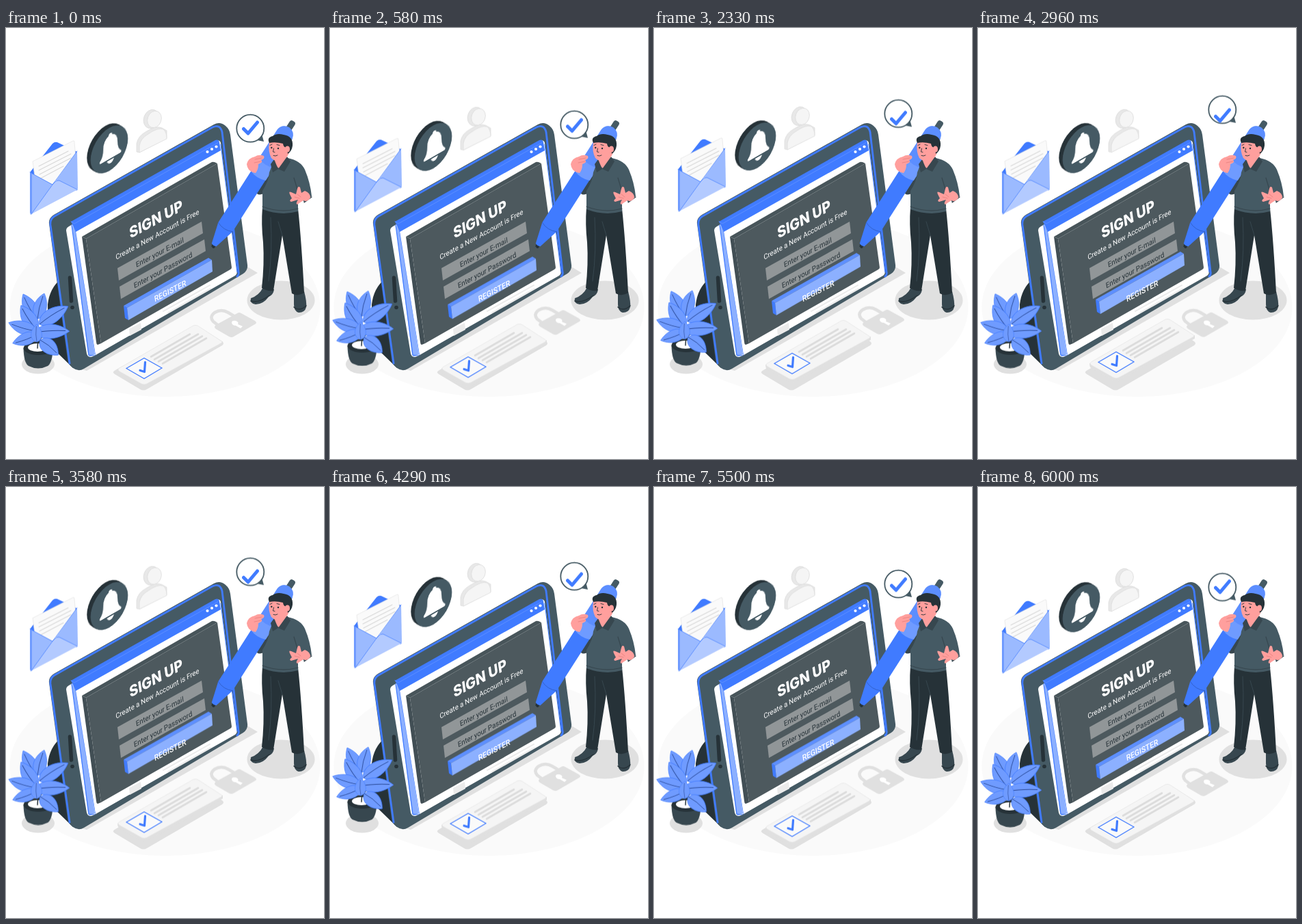
An HTML page for the animation above (6.04 s loop, 465 by 630 pixels).

```html
<!DOCTYPE html>
<html lang="en">
<head>
<meta charset="utf-8">
<title>Sign up</title>
<style>
  html, body { margin: 0; width: 100%; height: 100%; overflow: hidden; background: #fff; }
  svg { display: block; width: 465px; height: 630px; }
  text { font-family: Roboto, Inter, sans-serif; }

  .float { --rise: -9.3px; animation: float 3.02s linear infinite; }
  .slow { animation-duration: 6.04s; }
  .mid { --rise: -18.6px; }
  .high { --rise: -27.9px; }
  @keyframes float { 50% { transform: translateY(var(--rise)); } }

  .blue { fill: #407bff; }
  .soft { fill: #6f9bff; }
  .pale { fill: #8cb0ff; }
  .ink { fill: #263238; }
  .dark { fill: #37474f; }
  .slate { fill: #455a64; }
  .grey { fill: #e0e0e0; }
  .white { fill: #fff; }
  .skin { fill: #ff9f9d; }
  .field { fill: #919698; }
  .line { fill: none; stroke-linecap: round; stroke-linejoin: round; }
</style>
</head>
<body>
<svg viewBox="0 0 465 630">
  <defs>
    <g id="leaf">
      <path d="M0 0C4 -14 25 -16 40 0C25 13 5 13 0 0Z" class="soft" stroke="#407bff" stroke-width=".7"/>
      <path d="M0 0Q16 -3 35 -1" class="line" stroke="#2b4b98" stroke-width=".9"/>
    </g>
  </defs>

  <!-- floor and fixed shadows -->
  <ellipse cx="232.5" cy="408" rx="227" ry="131" fill="#fafafa"/>
  <ellipse cx="47" cy="491.500" rx="24" ry="14" class="grey"/>
  <ellipse cx="402" cy="398" rx="49.500" ry="28.500" class="grey"/>
  <path d="M335 346L353 349L368 358L118 501L100 496Z" class="grey"/>
  <path d="M160 500L276 436Q279 435 282 437L316 458Q320 461 316 464L206 528Q201 531 196 528L159 506Q154 503 160 500Z" class="grey"/>

  <!-- tablet -->
  <path d="M80 367Q64 380 61 404L62 462L98 497L108 480Z" class="ink"/>
  <path d="M63 286Q62 278 70 273L304 141Q313 136 321 143Q327 148 328 156L353 346Q354 354 347 359L114 498Q106 503 98 497Q91 492 90 485Z" class="slate"/>
  <path d="M93 490L65 288Q64 279 71 275L302 145Q313 140 316 152L340 356Q341 361 338 363" class="line" stroke="#407bff" stroke-width="2.800"/>
  <path d="M93.500 365L95.500 399" class="line" stroke="#263238" stroke-width="5.500"/>
  <circle cx="97" cy="408.500" r="2.800" class="ink"/>
  <path d="M88 296Q88 292 92 290L308 165Q313 163 314 168L338 355Q338 360 335 362L127 480Q120 483 118 476Z" class="white"/>

  <!-- browser window -->
  <path d="M96 287L102 296L130 477L124 480Q121 481 120 477Z" class="pale"/>
  <path d="M96 288L121 478L129 479M102 297L131 478" class="line" stroke="#407bff" stroke-width="1.200"/>
  <path d="M102 297L314 178L337 359L131 478Z" class="white"/>
  <path d="M95 283L306 164Q311 162 312 167L314 179L102 298Z" class="blue"/>
  <path d="M95 283L100 286L311 167" class="line" stroke="#5c8eff" stroke-width="1"/>
  <g class="white">
    <circle cx="294.500" cy="181" r="2.100"/><circle cx="301" cy="177" r="2.100"/><circle cx="307.500" cy="173.500" r="2.100"/>
  </g>
  <path d="M314 170L338 357" class="line" stroke="#407bff" stroke-width="1.200"/>
  <path d="M180 440L197 431L198 441L181 450Z" fill="#ebebeb"/>
  <path d="M230 414L298 376M237 416L299 381" class="line" stroke="#ebebeb" stroke-width="2"/>

  <!-- form -->
  <path d="M111 305L117 308L139 461L134 463Q132 462 132 459Z" fill="#424f55"/>
  <path d="M111 305L301 196Q304 195 309 198L117 308Z" fill="#48555a"/>
  <path d="M117 308L309 198L330 350Q330 352 328 353L139 461Z" fill="#4d595e"/>
  <path d="M163 351L286 283L288 300L165 369Z" class="field"/>
  <path d="M166 378L290 309L292 326L168 396Z" class="field"/>
  <circle cx="303.500" cy="320" r="2" class="ink"/>
  <g class="float slow">
    <path d="M172 406L177 409L179 427L174 424Z" class="blue"/>
    <path d="M172 406L296 336L301 339L177 409Z" fill="#5d8fff"/>
    <path d="M177 409L301 339L302 356L179 427Z" class="pale"/>
  </g>
  <g fill="#fff">
    <text transform="matrix(.87 -.47 .14 .98 181.500 308)" font-size="22" style="font-family:Inter,sans-serif;font-weight:800">SIGN UP</text>
    <text transform="matrix(.87 -.48 .14 .98 161 339)" font-size="10.700">Create a New Account is Free</text>
    <text transform="matrix(.87 -.46 .14 .98 217.500 400.500)" font-size="11.700" font-weight="500">REGISTER</text>
  </g>
  <g class="ink" font-size="10.700">
    <text transform="matrix(.87 -.46 .14 .98 190.500 350)">Enter your E-mail</text>
    <text transform="matrix(.87 -.47 .14 .98 187.500 380.500)">Enter your Password</text>
  </g>

  <!-- envelope -->
  <g class="float">
    <path d="M35 211L68 169Q72 165 77 168L104 181L104 212L37 240Z" class="blue"/>
    <path d="M39 195L98 165Q100 164 100 167L104 212L68 240L43 225Z" fill="#fafafa" stroke="#e0e0e0" stroke-width=".6"/>
    <path d="M48 202L91 180M48 208L95 184M49 214L95 190M50 220L84 202" class="line" stroke="#d8d8d8" stroke-width="1.100"/>
    <path d="M35 211L69 229L38 272Q35 274 35 270Z" fill="#9bbaff"/>
    <path d="M104 180L73 223L103 238Q105 237 105 234Z" fill="#9bbaff"/>
    <path d="M37 272L67 230Q72 222 78 223L105 236Z" fill="#b3caff"/>
    <path d="M35 211L68 229L104 180M37 272L68 229Q73 222 78 223L104 236" class="line" stroke="#407bff" stroke-width=".7"/>
    <path d="M35 211L35 270L38 272L38 213Z" class="soft"/>
  </g>

  <!-- bell -->
  <g class="float">
    <g transform="matrix(.866 -.5 0 1 151 177.500)">
      <circle cx="-6.300" cy="-6.200" r="31.500" class="ink"/>
      <path d="M22 -22.600L-22 22.600L-28.300 16.400L15.700 -28.800Z" class="ink"/>
      <circle r="31.500" class="slate"/>
      <g class="white" transform="translate(2 0)">
        <path d="M-3 -20Q-3 -23 0 -23Q3 -23 3 -20Q12 -17 12 -5Q12 6 18 11Q19 14 16 14H-16Q-19 14 -18 11Q-12 6 -12 -5Q-12 -17 -3 -20Z"/>
        <path d="M-6 16H6Q4 21 0 21Q-4 21 -6 16Z"/>
      </g>
    </g>
  </g>

  <!-- account icon -->
  <g class="float" stroke="#dedede" stroke-width=".8">
    <path d="M191 181L191 169Q193 158 204 152Q219 142 228 146L235 150L235 161L195 182Z" fill="#e8e8e8"/>
    <path d="M195 182L195 172Q197 161 208 155Q222 145 230 148Q235 152 235 162Z" fill="#f5f5f5"/>
    <ellipse cx="212.500" cy="133" rx="11" ry="14" fill="#e8e8e8" transform="rotate(20 212.500 133)"/>
    <ellipse cx="217" cy="133.500" rx="10" ry="12.500" fill="#f5f5f5" transform="rotate(20 217 133.500)"/>
  </g>

  <!-- speech bubble -->
  <g class="float slow high">
    <path d="M367 164L377 166L374 155Z" class="slate"/>
    <circle cx="357.300" cy="146.700" r="20" class="white" stroke="#455a64" stroke-width="1.800"/>
  </g>
  <path class="float slow mid line" d="M347.500 147.500L354 154L367.500 138" stroke="#407bff" stroke-width="5"/>

  <!-- padlock -->
  <g class="float">
    <path d="M312 436L303 429Q297 422 305 416Q315 410 325 416L335 422" class="line" stroke="#e0e0e0" stroke-width="4.600"/>
    <path d="M307 434L338 417Q341 415 344 417L364 428Q368 431 364 433L333 451Q330 453 326 451L307 440Q303 437 307 434Z" class="grey"/>
    <path d="M330 431Q330 427 336 428Q341 430 339 433L346 436L343 439L336 435Q331 435 330 431Z" class="white"/>
  </g>

  <!-- checklist card -->
  <g class="float slow">
    <path d="M163 499L202 519L317 458L317 463L206 525Q202 528 198 525L165 506Q163 504 163 499Z" class="grey"/>
    <path d="M166 497L274 435Q277 434 280 435L314 457Q318 459 314 461L206 520Q202 522 198 520L166 502Q162 499 166 497Z" fill="#f5f5f5" stroke="#e4e4e4" stroke-width=".7"/>
    <path d="M176 497.500L202 482.500L228 497L202 512.500Z" fill="#fafafa" stroke="#407bff" stroke-width="1.200"/>
    <path d="M196 500.500L202.500 502.500L203.500 488.500" class="line" stroke="#407bff" stroke-width="3.200"/>
    <path d="M212 480.500L269 447.500M217 484.500L281 447.500M223 487.500L287 450.500M229 490.500L293 453.500" class="line" stroke="#dcdcdc" stroke-width="2.600"/>
  </g>

  <!-- plant -->
  <g class="float">
    <path d="M25.500 468Q26 490 33 494Q47 501 61 494Q68 489 68.500 468Z" class="dark"/>
    <ellipse cx="47" cy="468" rx="21.500" ry="10" class="ink"/>
    <ellipse cx="46" cy="467" rx="14" ry="6" class="white"/>
    <path d="M46 468Q48 445 45 425M46 460Q38 448 30 440M47 460Q54 448 63 440" class="line" stroke="#263238" stroke-width="1.500"/>
    <use href="#leaf" transform="translate(45 425) rotate(-119) scale(1.030 .95)"/>
    <use href="#leaf" transform="translate(46 425) rotate(-75) scale(.96 .9)"/>
    <use href="#leaf" transform="translate(49 433) rotate(-32) scale(1.230 1)"/>
    <use href="#leaf" transform="translate(45 441) rotate(-123) scale(1.060 1)"/>
    <use href="#leaf" transform="translate(44 443) rotate(197) scale(1.050 .9)"/>
    <use href="#leaf" transform="translate(45 448) rotate(160) scale(.94 .85)"/>
    <use href="#leaf" transform="translate(44 445) rotate(-2) scale(1.220 1)"/>
    <use href="#leaf" transform="translate(50 456) rotate(40) scale(.86 1)"/>
    <use href="#leaf" transform="translate(45 459) rotate(-90) scale(.65 .75)"/>
  </g>

  <!-- pen -->
  <path d="M386 211L371 226Q364 238 367 242Q371 246 379 240L388 228Z" class="dark"/>
  <g transform="translate(302 320.500) rotate(-57.400)">
    <rect x="202" y="-4" width="17" height="9" rx="3.500" class="slate"/>
    <path d="M0 -2L7 -4V4L0 2Z" class="ink"/>
    <path d="M4 -4L35 -12.500H126V12.500H35L4 4Q2 0 4 -4Z" class="blue"/>
    <path d="M35 -12.500Q29 0 35 12.500" class="line" stroke="#315fc8" stroke-width=".8"/>
    <path d="M124 -13H196Q207 -11 208 0Q207 11 196 13H124Q119 0 124 -13Z" class="soft"/>
    <path d="M146 -13H196Q207 -11 208 0Q207 11 196 13H146Q141 0 146 -13Z" class="blue" opacity=".4"/>
  </g>

  <!-- man -->
  <path d="M376 379L392 382Q391 390 384 393Q376 404 365 404Q356 403 358 395Q370 391 376 379Z" class="dark"/>
  <path d="M421 386L436 385Q440 400 439 408Q437 416 428 416Q421 414 421 404Z" class="dark"/>
  <path d="M358 399Q369 403 385 391M421 408Q429 415 439 406" class="line" stroke="#263238" stroke-width="1.500"/>
  <path d="M375 262L427 264Q432 310 436 387Q427 393 418 388L404 303L391 384Q381 385 374 380Q378 345 376 313Q373 287 375 262Z" class="ink"/>
  <path d="M404 303L398 283M387 277Q390 325 384 370" class="line" stroke="#37474f" stroke-width="1"/>
  <path d="M392 193L412 190Q431 194 437 207Q445 226 447 246L436 255L427 238L427 268Q402 275 375 265L375 238Q384 224 385 211Z" class="slate"/>
  <path d="M427 239L421 219M436 255L447 247M375 261Q401 271 427 264" class="line" stroke="#37474f" stroke-width="1.200"/>
  <path d="M393 184L409 182L411 194Q406 205 399 205Q393 201 393 193Z" class="skin"/>
  <path d="M392 192L398 206L390 211L387 199ZM411 188L398 206L407 210L416 195Z" class="dark"/>
  <path d="M385 167Q391 159 402 160Q415 162 415 174Q415 190 402 194Q394 196 388 190Q383 181 385 167Z" class="skin"/>
  <path d="M385 168Q381 160 390 158Q396 153 406 156Q420 158 419 172Q418 180 412 184Q411 178 411 174Q406 176 405 169Q394 166 385 168Z" class="ink"/>
  <ellipse cx="411.500" cy="177" rx="3.500" ry="4.500" class="skin"/>
  <circle cx="388.300" cy="175" r="1.200" class="ink"/>
  <circle cx="398" cy="176" r="1.200" class="ink"/>
  <path d="M386 171.500L389 170M396 170.500L400 171.500M391.500 176L390.500 181L393 181.500M391 186.500Q394 188 397 186" class="line" stroke="#263238" stroke-width=".9"/>

  <!-- hands -->
  <path d="M361 211Q353 208 352 199Q354 190 364 188Q370 184 377 187Q379 191 373 193Q377 196 369 199Q369 207 365 212Z" class="skin"/>
  <path d="M364 192L374 190M363 197L373 195" class="line" stroke="#e57f7d" stroke-width=".8"/>
  <path d="M437 238Q445 241 445 248Q441 255 435 252Q430 255 426 258Q423 257 427 251L417 254Q413 253 418 249L415 243Q413 238 417 240L424 243L426 235Q427 230 430 233L432 241Z" class="skin"/>
  <path d="M426 243L431 247M422 247L429 249" class="line" stroke="#e57f7d" stroke-width=".8"/>
</svg>
</body>
</html>
```
